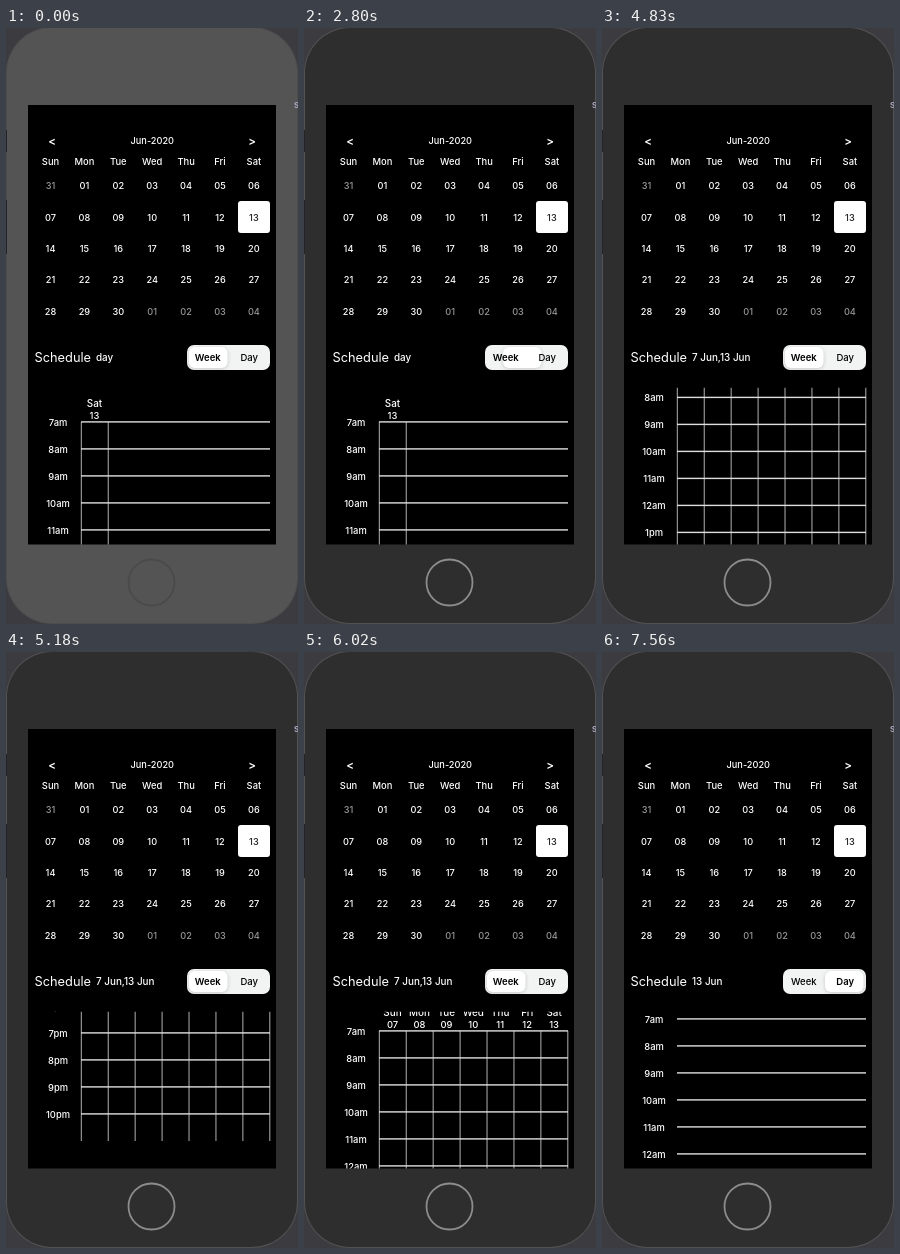
These frames come from a looping animation (292x596 px, 8 s). An HTML page with a canvas:

```html
<!DOCTYPE html>
<html lang="en">
<head>
<meta charset="utf-8">
<title>Calendar schedule</title>
<style>
html, body { margin: 0; width: 292px; height: 596px; overflow: hidden; background: #3c3b40; }
canvas { display: block; width: 292px; height: 596px; }
</style>
</head>
<body>
<canvas id="stage"></canvas>
<script>
const LOOP = 8000, STEP = 70, ROW = 27, COLUMN = 26.93;
const canvas = document.getElementById('stage');
const ctx = canvas.getContext('2d');
const ratio = window.devicePixelRatio || 1;
canvas.width = 292 * ratio;
canvas.height = 596 * ratio;
ctx.scale(ratio, ratio);

const DAYS = ['Sun', 'Mon', 'Tue', 'Wed', 'Thu', 'Fri', 'Sat'];
const HOURS = Array.from({ length: 16 }, (_, i) => i < 6 ? `${i + 7}am` : `${i - 5}pm`);
const LABELS = { single: 'day', day: '13 Jun', week: '7 Jun,13 Jun' };

// [time, value] keys; the toggle runs from 0 (Week) to 1 (Day)
const TOGGLE = [[2730, 0], [2800, .4], [2870, .85], [2940, 1], [3850, 1], [3920, .88], [4060, .25],
  [4130, .06], [4270, 0], [7070, 0], [7210, .15], [7350, .75], [7420, .94], [7560, 1]];
const SCROLL = [[4690, 0], [4760, 8], [4900, 95], [5040, 260], [5110, 318], [5180, 337], [5320, 320],
  [5530, 310], [5600, 300], [5740, 205], [5880, 85], [6020, 15], [6160, -18], [6300, -11],
  [6440, -4], [6580, -1], [6720, 0]];

function track(keys, t) {
  if (t <= keys[0][0]) return keys[0][1];
  const i = keys.findIndex(k => k[0] > t);
  if (i < 0) return keys[keys.length - 1][1];
  const [t0, a] = keys[i - 1], [t1, b] = keys[i];
  return a + (b - a) * (t - t0) / (t1 - t0);
}

const two = n => String(n).padStart(2, '0');
const mix = (a, b, k) => `rgb(${a.map((v, i) => Math.round(v + (b[i] - v) * k)).join()})`;

function text(str, x, y, { size = 9.5, color = '#fff', align = 'center', weight = 500 } = {}) {
  ctx.font = `${weight} ${size}px Inter, Roboto, sans-serif`;
  ctx.textAlign = align;
  ctx.textBaseline = 'alphabetic';
  ctx.fillStyle = color;
  ctx.fillText(str, x, y + size * .36);
}

function box(x, y, w, h, r, color) {
  ctx.beginPath();
  ctx.roundRect(x, y, w, h, r);
  ctx.fillStyle = color;
  ctx.fill();
}

function rect(x, y, w, h, color) {
  ctx.fillStyle = color;
  ctx.fillRect(x, y, w, h);
}

function phone(active) {
  rect(0, 0, 292, 596, '#3c3b40');
  box(0, -1, 292, 597, 46, mix([78, 78, 78], [82, 82, 82], active));
  box(1, 0, 290, 595, 45, mix([84, 84, 84], [46, 46, 46], active));
  rect(0, 102, 1, 22, '#242329');
  rect(0, 172, 1, 54, '#242329');
  text('s', 287.7, 76.5, { size: 10.5, align: 'left', color: '#b4aec8' });
  ctx.beginPath();
  ctx.arc(145.5, 554.5, 23, 0, 7);
  ctx.lineWidth = 1.8;
  ctx.strokeStyle = mix([74, 74, 74], [140, 140, 140], active);
  ctx.stroke();
  rect(22, 77, 248, 439.5, '#000');
}

function calendar() {
  text('<', 46, 113, { size: 11.5, weight: 600 });
  text('Jun-2020', 146.3, 113, { size: 9.2 });
  text('>', 246, 113, { size: 11.5, weight: 600 });
  DAYS.forEach((d, i) => text(d, 44.5 + i * 33.9, 134, { size: 9.4 }));
  box(232, 173, 32, 32, 3, '#fff');
  for (let i = 0; i < 35; i++) {
    const inMonth = i > 0 && i < 31;
    const n = i === 0 ? 31 : inMonth ? i : i - 30;
    const color = i === 13 ? '#222' : inMonth ? '#fff' : '#969696';
    text(two(n), 44.5 + i % 7 * 33.9, 158 + Math.floor(i / 7) * 31.3, { size: 9.2, color });
  }
}

function toggle(pos) {
  box(181, 317, 83, 25, 7, '#f2f4f4');
  ctx.save();
  ctx.shadowColor = 'rgba(0,0,0,.18)';
  ctx.shadowBlur = 4 * ratio;
  ctx.shadowOffsetY = ratio;
  box(183 + pos * 40, 319, 38.5, 21, 6, '#fff');
  ctx.restore();
  text('Week', 201.8, 329.3, { color: '#000', weight: pos < .5 ? 600 : 500 });
  text('Day', 243.2, 329.3, { color: '#000', weight: pos < .5 ? 500 : 600 });
}

function schedule(view, scroll) {
  ctx.save();
  ctx.beginPath();
  ctx.rect(22, 359.8, 248, 156.7);
  ctx.clip();
  const top = view === 'day' ? 367 : 394 - scroll;
  if (view !== 'day') {
    const days = view === 'week' ? DAYS : ['Sat'];
    const first = view === 'week' ? 7 : 13;
    days.forEach((d, i) => {
      const x = 88.5 + i * COLUMN;
      text(d, x, top - 18.5, { size: 9.9 });
      text(two(first + i), x, top - 6, { size: 9.4 });
    });
    for (let i = 0; i <= days.length; i++) {
      rect(74.8 + i * COLUMN, top, 1, HOURS.length * ROW, '#b0b0b0');
    }
  }
  HOURS.forEach((h, i) => {
    const y = top + i * ROW;
    text(h, 52, y + .3, { size: 9.4 });
    rect(75, y - .8, 189, 1.4, '#dedede');
  });
  ctx.restore();
}

function draw(now) {
  const t = Math.floor(now % LOOP / STEP) * STEP;
  const view = t < 2870 ? 'single' : t < 4200 || t >= 7490 ? 'day' : 'week';
  phone(t < 2590 ? 0 : t < 2660 ? .5 : 1);
  calendar();
  text('Schedule', 28.5, 329, { size: 12.8, align: 'left', weight: 400 });
  text(LABELS[view], 90, 329.5, { size: 9.9, align: 'left' });
  toggle(track(TOGGLE, t));
  schedule(view, track(SCROLL, t));
}

const start = performance.now();
function tick() {
  draw(performance.now() - start);
  requestAnimationFrame(tick);
}
tick();
</script>
</body>
</html>
```
